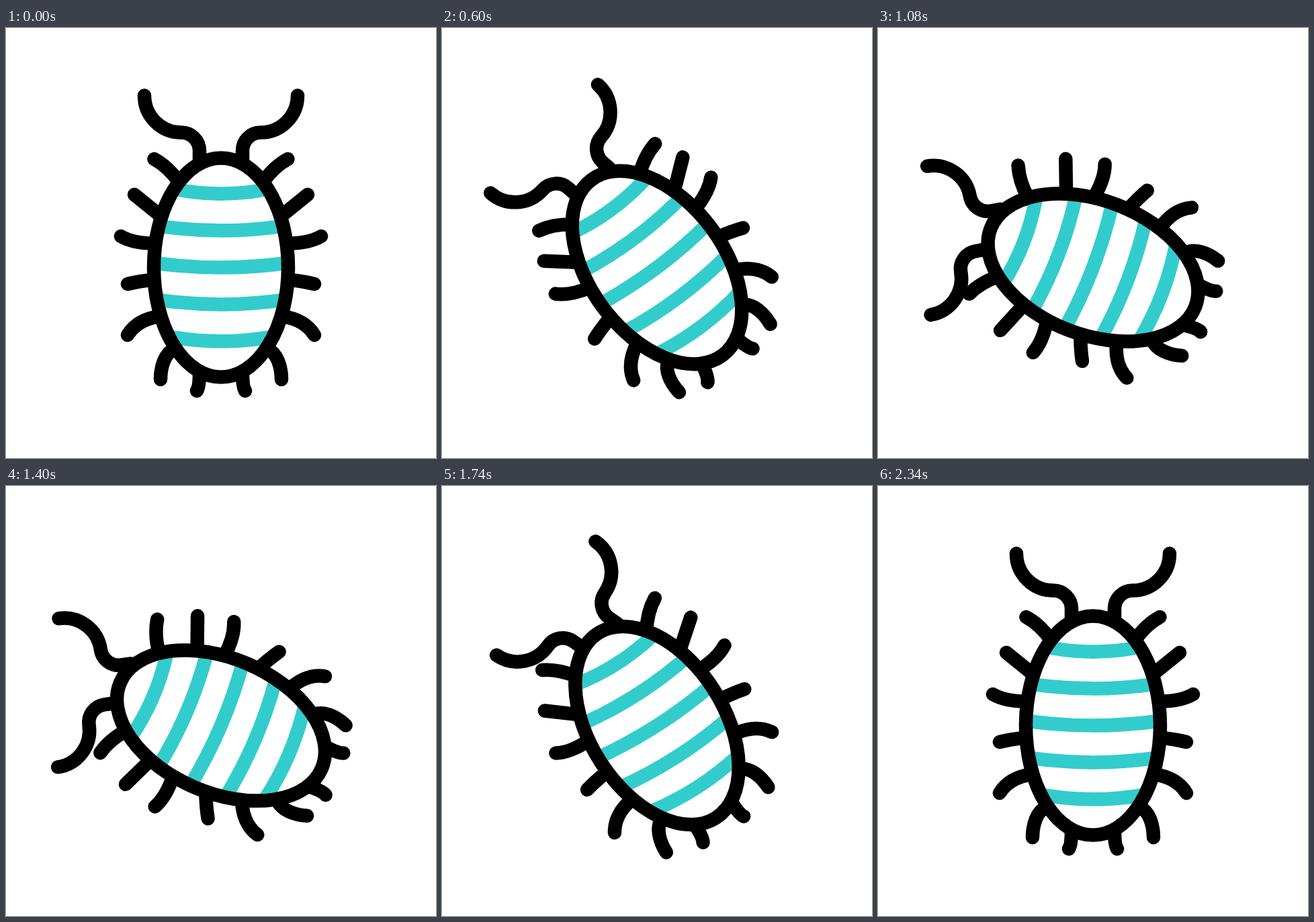
Animation of 640x640 px, one loop 2.4 s. Source, as an HTML page:

```html
<!DOCTYPE html>
<html lang="en">
<head>
<meta charset="utf-8">
<title>Crawling bug</title>
<style>
  html, body { margin: 0; width: 100%; height: 100%; overflow: hidden; background: #fff; }
  svg { display: block; width: 100vw; height: 100vh; }
</style>
</head>
<body>
<svg viewBox="0 0 640 640">
  <g id="bug" fill="none" stroke="#000" stroke-width="20.5" stroke-linecap="round"></g>
</svg>
<script>
const LOOP = 2400, STEP = 20, LAST = 2340;
const CX = 320, CY = 356.5, RX = 100, RY = 163;
const TURN = 69.2, SWAY = 31.5;
const GAIT = 870, GAIT_END = 2 * GAIT;
const GAIT_TIMES = [0, 210, 320, 530, 600, GAIT];

// Left-hand limbs; each one swings about its joint and is mirrored on the right.
const ANTENNA = {
  d: 'M206 100.5A55 55 0 0 0 261 155.5A27 27 0 0 1 288 182.5V197',
  joint: [288, 197]
};
const LEGS = [
  { d: 'M220.5 195Q241 206 258 230', joint: [258, 230], swing: [4.9, 5.2, 16.7, 16.8] },
  { d: 'M191 248L230 279.5', joint: [230, 279.5], swing: [17.2, 33.6, 16.4, 0] },
  { d: 'M171 310Q190 321 222 320.5', joint: [222, 320.5], swing: [9.2, 38.8, 3.9, -14.9] },
  { d: 'M181 381Q197 377 220 374.5', joint: [220, 374.5], swing: [15.4, 26.4, 18.5, 7.3] },
  { d: 'M181 457Q195 434 229 429', joint: [229, 429], swing: [6.3, 5.9, 17.7, 17.4] },
  { d: 'M230 523C230 503 237 484 250 478', joint: [250, 478], swing: [17.5, 28.4, 20.3, 6.6] },
  { d: 'M284 540Q288 534 288 512', joint: [288, 512], swing: [7.3, 38.8, 4.4, -12.4] }
];

const bug = document.getElementById('bug');

function add(tag, attrs, parent = bug) {
  const el = document.createElementNS('http://www.w3.org/2000/svg', tag);
  for (const k in attrs) el.setAttribute(k, attrs[k]);
  parent.appendChild(el);
  return el;
}

function addPair(limb) {
  const mirror = add('g', { transform: `translate(${2 * CX} 0) scale(-1 1)` });
  limb.left = add('path', { d: limb.d });
  limb.right = add('path', { d: limb.d }, mirror);
}

function rotate(el, angle, x, y) {
  el.setAttribute('transform', `rotate(${angle.toFixed(3)} ${x} ${y})`);
}

[ANTENNA, ...LEGS].forEach(addPair);
add('ellipse', { cx: CX, cy: CY, rx: RX, ry: RY, fill: '#fff', stroke: 'none' });
for (let i = -2; i <= 2; i++) {
  const y = CY + i * 54.9, sag = 7;
  const w = RX * Math.sqrt(1 - ((y - sag - CY) / RY) ** 2);
  add('path', {
    d: `M${CX - w} ${y - sag}Q${CX} ${y + sag} ${CX + w} ${y - sag}`,
    stroke: '#33cccc', 'stroke-linecap': 'butt'
  });
}
add('ellipse', { cx: CX, cy: CY, rx: RX, ry: RY });

function ease(t) {
  t = Math.min(1, Math.max(0, t));
  return t < 0.5 ? 4 * t ** 3 : 1 - 4 * (1 - t) ** 3;
}

// Smooth curve through values at the gait times, flat at both ends.
function curve(values, t) {
  const T = GAIT_TIMES, v = [0, ...values, 0], n = T.length - 1;
  let i = 0;
  while (i < n - 1 && t >= T[i + 1]) i++;
  const slope = k => k === 0 || k === n ? 0 : (v[k + 1] - v[k - 1]) / (T[k + 1] - T[k - 1]);
  const h = T[i + 1] - T[i], u = (t - T[i]) / h, r = 1 - u;
  return v[i] * (1 + 2 * u) * r * r + v[i + 1] * u * u * (3 - 2 * u)
    + h * u * r * (slope(i) * r - slope(i + 1) * u);
}

function draw(ms) {
  const t = Math.min(LAST, Math.floor((ms % LOOP) / STEP) * STEP);
  const turn = TURN * (ease((t - 28) / 1120) - ease((t - 1174) / 1110));
  const sway = SWAY * (ease(t / 1320) - ease((t - 1320) / 1020));
  rotate(bug, -turn, CX, CY);
  // Antennae sweep the same way; the right one lives in mirrored space.
  rotate(ANTENNA.left, -sway, ...ANTENNA.joint);
  rotate(ANTENNA.right, sway, ...ANTENNA.joint);
  for (const leg of LEGS) {
    const q = t < GAIT_END ? curve(leg.swing, t % GAIT) : 0;
    rotate(leg.left, -q, ...leg.joint);
    rotate(leg.right, -q, ...leg.joint);
  }
}

const start = performance.now();
function tick(now) {
  draw(Math.max(0, now - start));
  requestAnimationFrame(tick);
}
draw(0);
requestAnimationFrame(tick);
</script>
</body>
</html>
```
